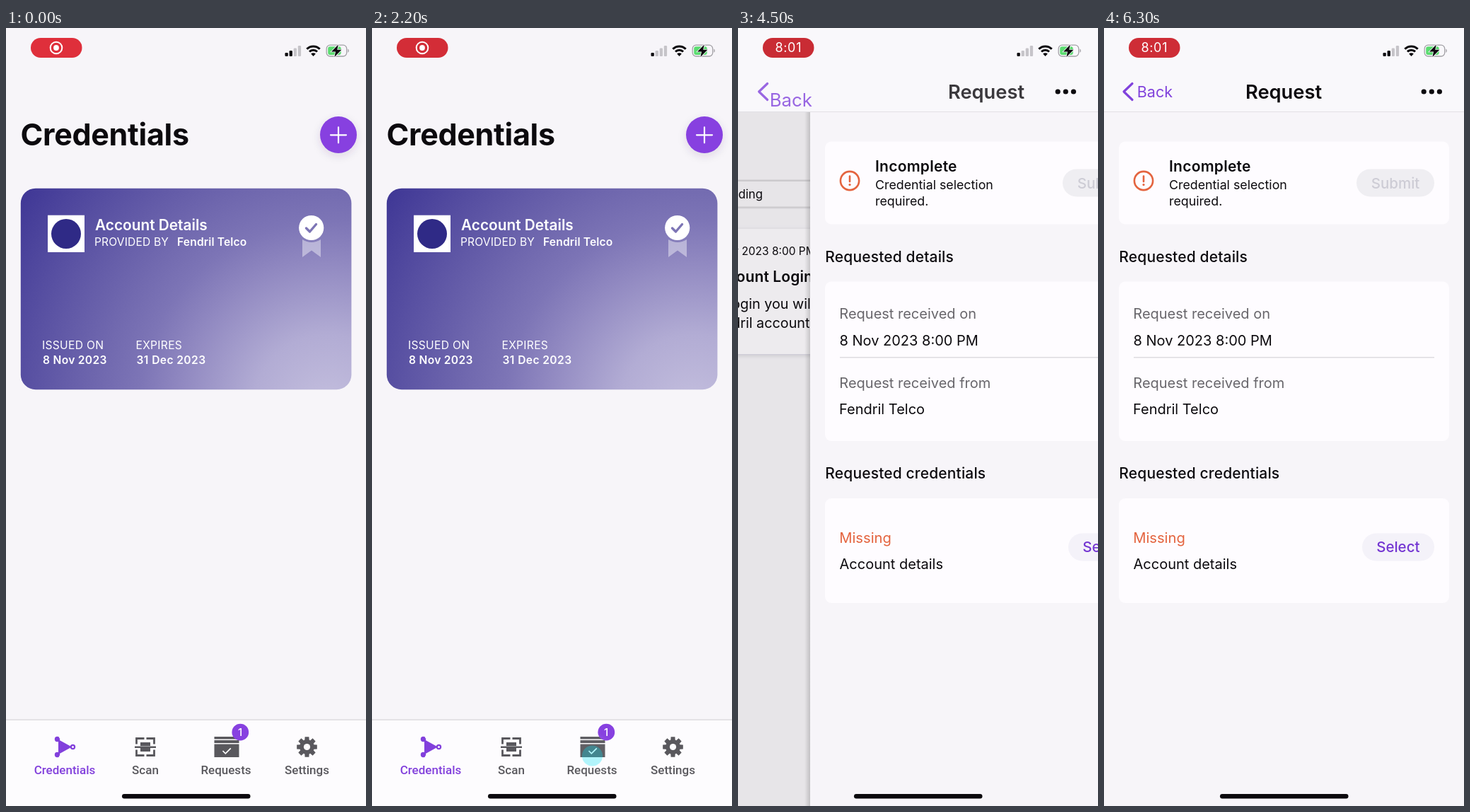
These frames come from a looping animation (509 by 1100 pixels, 6.4 s). An HTML page:

```html
<!DOCTYPE html>
<html lang="en">
<head>
<meta charset="utf-8">
<title>Credential wallet</title>
<style>
  html, body { margin: 0; width: 100%; height: 100%; overflow: hidden; background: #f7f5f9; }
  svg { display: block; width: 100%; height: 100vh; }
  text { font-family: Inter, "Liberation Sans", sans-serif; font-optical-sizing: none; white-space: pre; }
  .tab text { font-family: Roboto, "Open Sans", sans-serif; font-weight: 500; font-size: 17px; text-anchor: middle; }
  .tab { --c: #59585d; }
  .tab.on { --c: #8240dc; }
  .tab .f, .tab text { fill: var(--c); }
  .tab .s { stroke: var(--c); fill: none; }
</style>
</head>
<body>
<svg id="stage" viewBox="0 0 509 1100" xmlns="http://www.w3.org/2000/svg"></svg>
<script>
const LOOP = 6400, W = 509;
const INK = '#0c0a0e', GREY = '#68666b', PURPLE = '#8741e0', ORANGE = '#e4643f', BG = '#f7f5f9', CARD = '#fefcff';
const COMPANY = 'Fendril';

// ---- drawing helpers ----
const text = (str, x, y, size, { w = 400, fill = INK, ls = 0, anchor = 'start', id = '' } = {}) =>
  `<text ${id && `id="${id}"`} x="${x}" y="${y}" font-size="${size}" font-weight="${w}" fill="${fill}" letter-spacing="${ls}" text-anchor="${anchor}">${str}</text>`;
const rect = (x, y, w, h, r, fill, more = '') =>
  `<rect x="${x}" y="${y}" width="${w}" height="${h}" rx="${r}" fill="${fill}" ${more}/>`;
const circle = (x, y, r, fill, more = '') => `<circle cx="${x}" cy="${y}" r="${r}" fill="${fill}" ${more}/>`;
const line = (d, stroke, w, more = '') =>
  `<path d="${d}" fill="none" stroke="${stroke}" stroke-width="${w}" ${more}/>`;
const group = (id, body, more = '') => `<g id="${id}" ${more}>${body}</g>`;
const round = 'stroke-linecap="round" stroke-linejoin="round"';

const alertIcon = (x, y) =>
  circle(x, y, 13.1, 'none', `stroke="${ORANGE}" stroke-width="2.6"`) +
  line(`M${x} ${y - 6.5}v7.6`, ORANGE, 2.6, round) + circle(x, y + 5.6, 1.6, ORANGE);

function gear(x, y) {
  const pts = [];
  for (let i = 0; i < 8; i++) {
    for (const [da, r] of [[-.31, 10.4], [-.2, 14.6], [.2, 14.6], [.31, 10.4]]) {
      const a = i * Math.PI / 4 + da;
      pts.push((x + r * Math.cos(a)).toFixed(2) + ' ' + (y + r * Math.sin(a)).toFixed(2));
    }
  }
  return `<path class="f" d="M${pts.join('L')}Z"/>` + circle(x, y, 4.6, '#fdfcfe');
}

const defs = `<defs>
  <radialGradient id="cardFill" gradientUnits="userSpaceOnUse" cx="455" cy="540" r="535">
    <stop offset="0" stop-color="#c4bfde"/><stop offset=".2" stop-color="#b2acd4"/>
    <stop offset=".4" stop-color="#8f87c0"/><stop offset=".5" stop-color="#7d75b6"/>
    <stop offset=".6" stop-color="#7169af"/><stop offset=".8" stop-color="#5850a2"/>
    <stop offset="1" stop-color="#3e3695"/>
  </radialGradient>
  <radialGradient id="halo">
    <stop offset=".85" stop-color="#fffdff"/><stop offset="1" stop-color="#fffdff" stop-opacity="0"/>
  </radialGradient>
  <linearGradient id="edge">
    <stop offset="0" stop-opacity="0"/><stop offset="1" stop-opacity=".16"/>
  </linearGradient>
  <filter id="soft" x="-20%" y="-20%" width="140%" height="150%">
    <feDropShadow dx="0" dy="2" stdDeviation="3.2" flood-color="#1c1430" flood-opacity=".15"/>
  </filter>
  <filter id="glow" x="-50%" y="-50%" width="200%" height="200%">
    <feDropShadow dx="0" dy="4" stdDeviation="6" flood-color="#3a2a60" flood-opacity=".14"/>
  </filter>
</defs>`;

// ---- screens ----
const white = { fill: '#fff', ls: .3 };
const whiteBold = { fill: '#fff', ls: .3, w: 600 };
const credentials = group('credentials',
  text('Credentials', 20.5, 165.5, 43, { w: 700, ls: -.3 }) +
  circle(470, 151, 26, PURPLE, 'filter="url(#glow)"') +
  line('M459 151.300h22M470 140.300v22', '#fff', 2.2, round) +
  rect(20.8, 226.7, 467.6, 284.5, 21, 'url(#cardFill)') +
  rect(59, 264.7, 52, 52.3, 0, '#fff') + circle(85, 291, 21, '#2f2a86') +
  text('Account Details', 126, 286, 20.8, { fill: '#fff', w: 600 }) +
  text('PROVIDED BY', 125, 308, 15.6, { fill: '#fff', ls: .15 }) +
  text(COMPANY + ' Telco', 242, 308, 15.6, { fill: '#fff', w: 600, ls: .15 }) +
  text('ISSUED ON', 51, 454, 15.6, white) + text('8 Nov 2023', 52, 474.5, 15.6, whiteBold) +
  text('EXPIRES', 183.5, 454, 15.6, white) + text('31 Dec 2023', 184.5, 474.5, 15.6, { ...whiteBold, ls: .4 }) +
  '<path d="M419 299q13 8 26 0v25l-13-9.500-13 9.500z" fill="#fff" fill-opacity=".42"/>' +
  circle(431.7, 282.5, 17.6, '#fff') + line('M424.500 283l5 5 9-10.500', '#7d75b5', 3.4, round));

const list = group('list',
  rect(18.5, 214, 472, 41.5, 10, '#e8e6e9') +
  rect(20.5, 216, 232, 37.5, 8, BG, 'stroke="#dad8dc" stroke-width="2"') +
  text('Pending', 136.5, 241, 16.8, { anchor: 'middle' }) +
  text('Completed', 373, 241, 16.8, { anchor: 'middle' }) +
  rect(21, 284, 467, 177, 10, CARD, 'filter="url(#soft)"') +
  alertIcon(56, 370) +
  text('8 Nov 2023 8:00 PM', 91.5, 320.5, 15.5) +
  text('Account Login', 91.8, 358.5, 21, { w: 600, ls: .1 }) +
  text('To login you will need to present your', 91.7, 396.5, 19.8) +
  text(COMPANY + ' account details credential.', 91, 423.5, 19.8) +
  line('M456.500 363.500l8.500 8-8.500 8', '#929096', 2.6, round));

const page = group('page',
  rect(-8, 118, 8, 982, 0, 'url(#edge)') + rect(0, 118, W, 982, 0, BG) +
  rect(21, 160.5, 467, 117, 9, CARD) + alertIcon(56, 216) +
  text('Incomplete', 92, 203, 21, { w: 600, ls: .25 }) +
  text('Credential selection', 92, 228, 17.8) + text('required.', 92, 251, 17.8) +
  rect(357, 199.5, 110, 39, 19.5, '#efeef2') +
  text('Submit', 412, 226.5, 20.5, { w: 500, fill: '#cdccd5', anchor: 'middle' }) +
  text('Requested details', 21.3, 330.5, 21, { w: 500, ls: .15 }) +
  rect(21, 358.5, 467, 225.5, 9, CARD) +
  text('Request received on', 41.3, 411, 20, { fill: GREY }) +
  text('8 Nov 2023 8:00 PM', 41.5, 448.5, 20) +
  rect(42, 465, 425, 1.5, 0, '#dedce0') +
  text('Request received from', 41.3, 508.5, 20, { fill: GREY }) +
  text(COMPANY + ' Telco', 41, 546, 20) +
  text('Requested credentials', 21.3, 637, 21, { w: 500, ls: .15 }) +
  rect(21, 665, 467, 148, 9, CARD) +
  text('Missing', 41.2, 727.5, 20.2, { fill: ORANGE }) +
  text('Account details', 41.5, 765, 20) +
  rect(365, 714.5, 102, 39, 19.5, '#f4f2f9') +
  text('Select', 415.8, 741, 20.5, { w: 500, fill: '#7436d2', anchor: 'middle' }));

const nav = group('nav',
  rect(0, 0, W, 118, 0, '#f9f8fb') + rect(0, 118, W, 1, 0, '#e2e0e5') +
  line('M40 78.500L28 90l12 11.500', '#8142dc', 3.2, `id="chevron" ${round}`) +
  text('Back', 0, 0, 21.5, { fill: '#8142dc', id: 'back' }) +
  text('Request', 254, 99.5, 27.3, { w: 600, anchor: 'middle', id: 'navTitle' }) +
  [452.2, 463.3, 474.4].map(x => circle(x, 90, 3.6, INK)).join(''));

// ---- tab bar ----
const tab = (id, label, x, icon) => group(id, icon + `<text x="${x}" y="1055">${label}</text>`, 'class="tab"');
const corner = (x, y, sx, sy) => `M${x} ${y + 8 * sy}v${-8 * sy}h${11 * sx}`;
const tabs = group('tabs',
  rect(0, 978, W, 122, 0, '#fdfcfe') + rect(0, 977.5, W, 1.2, 0, '#d6d4d9') +
  tab('tabCred', 'Credentials', 83, '<path class="f" d="M74 1006l19 10.500-19 10.500z"/>' +
    [[72.5, 1005.5], [72.5, 1027.5], [94.5, 1016.5]].map(([x, y]) => `<circle class="f" cx="${x}" cy="${y}" r="3.700"/>`).join('') +
    '<circle cx="94.500" cy="1016.500" r="1.500" fill="#fdfcfe"/><path d="M75.500 1003l5 3M75.500 1030l5-3" stroke="#fdfcfe" stroke-width="2"/>') +
  tab('tabScan', 'Scan', 197, `<path class="s" stroke-width="2.800" d="${corner(184.5, 1004.5, 1, 1)}${corner(209.5, 1004.5, -1, 1)}${corner(184.5, 1028.5, 1, -1)}${corner(209.5, 1028.5, -1, -1)}"/>
    <path class="f" d="M190 1010h14v5h-14zM182 1015.500h30v2.600h-30zM190 1018h14v5h-14z"/>`) +
  tab('tabReq', 'Requests', 311, '<path class="f" d="M294.500 1002h35v3.500h-35zM294.500 1007h35v4h-35zM294.500 1012.500h35v18.500h-35z"/>' +
    line('M306.500 1022l3.800 3.800 7.500-7.500', '#fff', 1.7)) +
  tab('tabSet', 'Settings', 425.5, gear(425.5, 1016.5)) +
  circle(331.3, 995.7, 11.9, PURPLE) + text('1', 331.2, 1001.2, 15, { w: 500, fill: '#fff', anchor: 'middle' }));

// ---- status bar ----
const arc = (r, w) => {
  const k = r * Math.SQRT1_2;
  return line(`M${434.5 - k} ${39 - k}A${r} ${r} 0 0 1 ${434.5 + k} ${39 - k}`, INK, w);
};
const status =
  rect(35, 14, 72.5, 28, 14, '#db2e38', 'id="pill"') +
  group('rec', circle(71, 28, 8.3, 'none', 'stroke="#fff" stroke-width="2"') + circle(71, 28, 3.9, '#fff')) +
  text('8:01', 71.3, 34.3, 18, { fill: '#fff', ls: .7, anchor: 'middle', id: 'clock' }) +
  [5, 8, 11.5, 15].map((h, i) => rect(394.5 + 6.1 * i, 40 - h, 4.3, h, 1.2, '#c6c4c9', `id="bar${i}"`)).join('') +
  arc(13, 3) + arc(7.8, 3) + '<path d="M434.500 40l-3.300-3.400a4.700 4.700 0 0 1 6.600 0z" fill="#0c0a0e"/>' +
  rect(453.2, 24.2, 28.5, 15.8, 5, 'none', 'stroke="#a3a1a6" stroke-width="1.300"') +
  rect(455.2, 26.2, 18.5, 11.8, 3, '#5bdc70') +
  '<path d="M483.300 29.500c2 .8 2 4.500 0 5.300z" fill="#a3a1a6"/>' +
  '<path d="M469.800 23.500l-9.800 10h6l-1.600 7.500 10-10.300h-6.200z" fill="#0c0a0e" stroke="#f7f5f9" stroke-width="1.600" paint-order="stroke"/>';

const stage = document.getElementById('stage');
stage.innerHTML = defs + rect(0, 0, W, 1100, 0, BG) + credentials + list + tabs +
  rect(0, 118, W, 982, 0, '#000', 'id="dim"') + page + nav +
  text('Requests', 0, 0, 43, { w: 700, ls: -.1, id: 'bigTitle' }) + status +
  rect(164, 1083, 181.5, 6.5, 3.2, INK) +
  group('touch', circle(0, 0, 20, 'url(#halo)', 'id="ring"') + circle(0, 0, 14.6, '#18e6f6'));

// ---- timeline ----
const el = {};
stage.querySelectorAll('[id]').forEach(e => el[e.id] = e);
const set = (id, name, value) => el[id].setAttribute(name, value);
const show = (id, on) => set(id, 'display', on ? 'inline' : 'none');
const clamp = v => Math.max(0, Math.min(1, v));
const mix = (a, b, k) => a + (b - a) * k;

const TO_LIST = 2250, CLOCK = 3000, PUSH = 4270;
const TAP_MS = 750;
const TAPS = [[TO_LIST - TAP_MS, 311.5, 1029], [PUSH - TAP_MS, 348.5, 372]];

function draw(t) {
  const onList = t >= TO_LIST, pushing = t >= PUSH;

  // critically damped push; rest runs from 1 to 0
  const u = Math.max(0, t - PUSH) * .01295;
  const rest = (1 + u) * Math.exp(-u);

  show('credentials', !onList);
  show('list', onList);
  show('bigTitle', onList);
  show('tabs', !pushing);
  ['page', 'nav', 'dim'].forEach(id => show(id, pushing));
  set('tabCred', 'class', onList ? 'tab' : 'tab on');
  set('tabReq', 'class', onList ? 'tab on' : 'tab');

  set('page', 'transform', `translate(${W * rest} 0)`);
  set('list', 'transform', `translate(${-167.5 * (1 - rest)} 0)`);
  set('dim', 'opacity', .085 * (1 - rest));
  set('navTitle', 'transform', `translate(${484 * rest} 0)`);
  set('navTitle', 'opacity', 1 - rest);
  set('chevron', 'opacity', 1 - rest);
  set('chevron', 'transform', `translate(${8 * rest} 0)`);

  // the large title shrinks into the back label
  const y = mix(97.5, 165.5, rest), scale = mix(21.5, 43, rest);
  set('back', 'transform', `translate(${mix(46.8, 36, rest)} ${y}) scale(${scale / 21.5})`);
  set('back', 'opacity', 1 - rest);
  set('bigTitle', 'transform', `translate(${mix(46.8, 19.5, rest)} ${y}) scale(${scale / 43})`);
  set('bigTitle', 'opacity', clamp((rest - .3) / .7));

  const pulse = .5 + .5 * Math.cos((t - 1540) * Math.PI / 1000);
  set('pill', 'fill', `rgb(${mix(201, 240, pulse)},${mix(44, 49, pulse)},${mix(52, 64, pulse)})`);
  show('rec', t < CLOCK);
  show('clock', t >= CLOCK);
  const bars = t < 900 || t >= 5300 ? 2 : 1;
  for (let i = 0; i < 4; i++) set('bar' + i, 'fill', i < bars ? INK : '#c6c4c9');

  const tap = TAPS.find(([at]) => t >= at && t < at + TAP_MS);
  show('touch', tap);
  if (tap) {
    const s = (t - tap[0]) / TAP_MS;
    set('touch', 'transform', `translate(${tap[1]} ${tap[2]})`);
    set('touch', 'opacity', clamp(s * 12) * clamp((1 - s) * 5));
    set('ring', 'r', 14 + 21 * s);
    set('ring', 'opacity', clamp(2 * (1 - s)));
  }
}

const start = performance.now();
function tick() {
  draw((performance.now() - start) % LOOP);
  requestAnimationFrame(tick);
}
tick();
</script>
</body>
</html>
```
